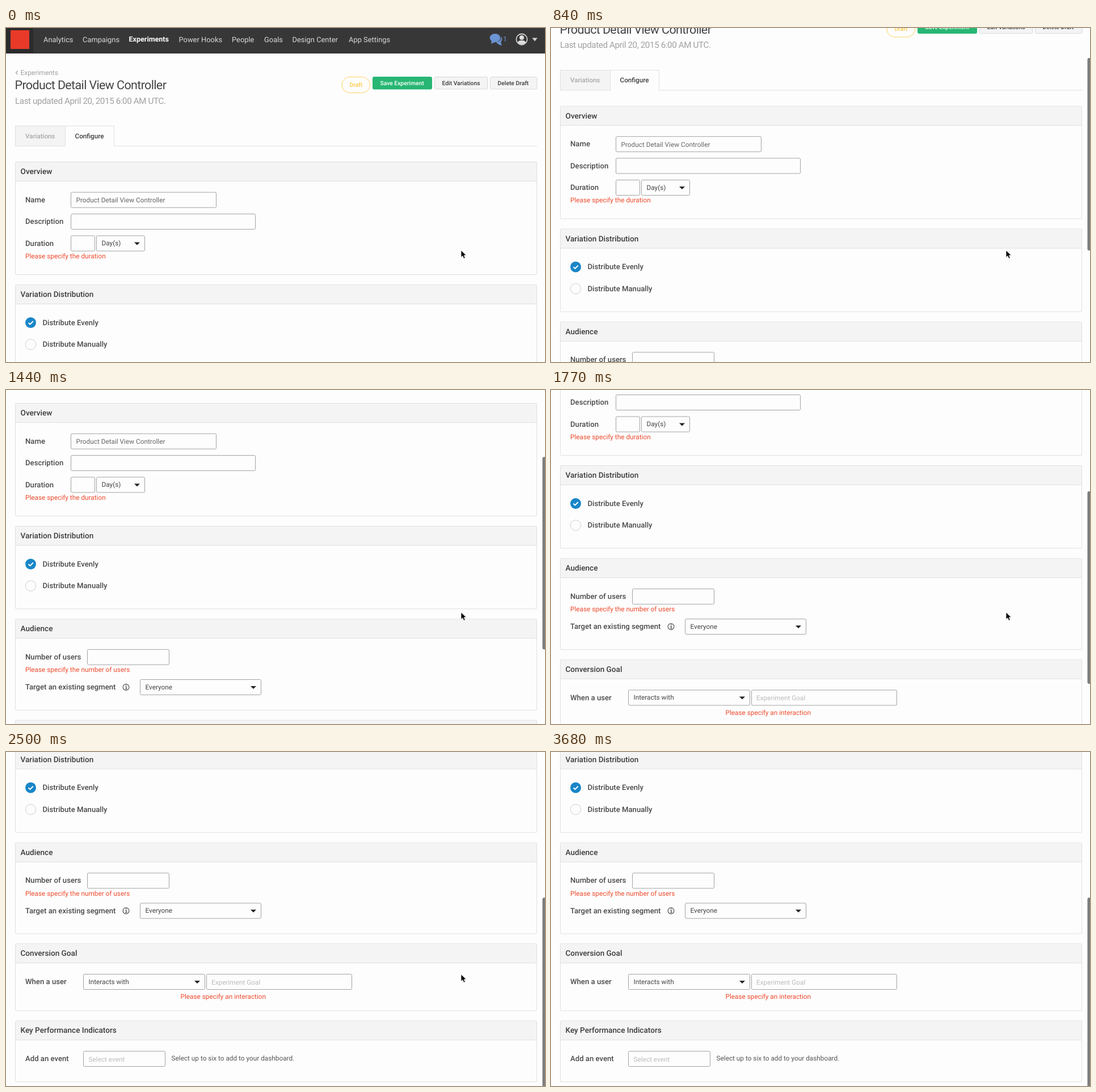
These frames come from a looping animation (950x590 px, 4480 ms). An HTML page:

```html
<!DOCTYPE html>
<html lang="en">
<head>
<meta charset="utf-8">
<title>Experiment settings</title>
<style>
  html, body { margin: 0; width: 100%; height: 100%; overflow: hidden; background: #fdfdfd; }
  svg { display: block; width: 950px; height: 590px; }
  text { font-family: Roboto, Inter, sans-serif; white-space: pre; text-rendering: geometricPrecision; }
</style>
</head>
<body>
<svg id="stage" viewBox="0 0 950 590">
  <g id="page"></g>
  <rect id="thumb" x="945.5" width="8" height="340" rx="3" fill="#7c7c7c"/>
  <path id="cursor" d="M0 0V12.6L2.9 9.9 5 14.5 7.3 13.5 5.3 9H9.3Z" fill="#000" stroke="#fff" stroke-width=".8"/>
</svg>
<script>
const LOOP = 4480;
// [start time, scroll offset]
const SCROLL = [
  [0, 0], [450, 14], [690, 58], [840, 98.5], [990, 134], [1140, 168.5],
  [1290, 195], [1440, 213], [1620, 237], [1770, 320], [1910, 390],
  [2060, 431.5], [2210, 445], [2350, 453], [2500, 457.5], [2650, 459],
  [2800, 460], [2940, 458.5], [3090, 457.5]
];
// [start time, tip x, tip y]
const POINTER = [
  [0, 802, 392.7], [3090, 868.7, 473.5], [3240, 920.7, 537.5],
  [3390, 931.7, 561.5], [3530, 933.7, 575.5], [3680, 960, 600]
];
const INK = '#4a4a4a', DARK = '#3b3b3b', GREY = '#a0a0a0', RED = '#ee4a2d';
const FIELD = '#a3a3a3', EDGE = '#e0e0e0', SHADE = '#f4f4f4', PAPER = '#fdfdfd';

const $ = id => document.getElementById(id);
const page = $('page');

function add(tag, attrs, content) {
  const node = document.createElementNS('http://www.w3.org/2000/svg', tag);
  for (const key in attrs) node.setAttribute(key, attrs[key]);
  if (content) node.textContent = content;
  page.append(node);
  return node;
}
const box = (x, y, right, bottom, fill, stroke = 'none', rx = 0) =>
  add('rect', { x, y, width: right - x, height: bottom - y, fill, stroke, rx });
const path = (d, fill, stroke = 'none', width = 1) =>
  add('path', { d, fill, stroke, 'stroke-width': width });
const circle = (cx, cy, r, fill, stroke = 'none', width = 1) =>
  add('circle', { cx, cy, r, fill, stroke, 'stroke-width': width });

// Text is placed by its left edge and the middle of its capitals.
const write = (content, x, middle, size, fill = INK, weight = 400, spacing = 0) =>
  add('text', {
    x, y: middle + size * 0.355, fill,
    'font-size': size, 'font-weight': weight, 'letter-spacing': spacing
  }, content);
const label = (content, x, middle) => write(content, x, middle, 13.15, INK, 500);
const small = (content, x, middle, fill) => write(content, x, middle, 11.8, fill);

const field = (x, y, right) => box(x, y, right, y + 27, PAPER, FIELD, 2);
const caret = (x, y, fill, w = 5, h = 5) =>
  path(`M${x - w} ${y - h / 2}h${2 * w}l${-w} ${h}z`, fill);

function select(content, x, y, right) {
  field(x, y, right);
  small(content, x + 9, y + 13.2, '#444');
  caret(right - 13.5, y + 14, '#222');
}
function panel(title, top, bottom) {
  box(16.5, top, 935.5, bottom, PAPER, EDGE, 1.5);
  box(17, top + 0.5, 935, top + 34, SHADE);
  box(17, top + 33.5, 935, top + 34.5, EDGE);
  write(title, 25.5, top + 16.7, 13.6, DARK, 500);
}
function button(content, x, right, textX, fill, stroke, ink) {
  box(x, 86.5, right, 108, fill, stroke, 2);
  write(content, textX, 97.2, 10.3, ink, 500);
}

function drawTopBar() {
  box(0, 0, 950, 45, '#383738');
  box(0, 0, 48, 45, '#2c2b2c');
  box(0, 44, 950, 45, '#2b2a2b');
  box(8, 4, 41, 37, '#e93a29');
  [['Analytics', 66], ['Campaigns', 135], ['Power Hooks', 304.5], ['People', 398],
   ['Goals', 455], ['Design Center', 504.5], ['App Settings', 604]]
    .forEach(([name, x]) => write(name, x, 20, 12.9, '#dadada'));
  write('Experiments', 216.5, 20, 12.55, '#fff', 700);

  const blue = '#6b94d3';
  path('M864 25Q873 24 873 15Q876 20 872 25L874 30.5Q869 30 867 28Q865 27 864 25Z', blue);
  add('ellipse', { cx: 862, cy: 17.5, rx: 9.3, ry: 7.5, fill: blue });
  path('M856 22L855 27.5Q860 27 863 24Z', blue);
  write('1', 876, 20, 12.5, blue);

  circle(909, 20, 9.6, '#383738', '#dedede', 1.6);
  circle(909, 17, 4, '#dedede');
  path('M902 26Q903 22 907 22H911Q915 22 916 26Q909 32 902 26Z', '#dedede');
  caret(932, 20.5, '#d0d0d0', 4.7, 6);
}

function drawHeading() {
  path('M20.5 75.5L17.5 78.7L20.5 82', 'none', GREY, 1.2);
  write('Experiments', 25.5, 79, 12, GREY);
  write('Product Detail View Controller', 15.5, 100.7, 21.5, '#444', 400, -0.64);
  write('Last updated April 20, 2015 6:00 AM UTC.', 16, 128.4, 15.2, GREY, 400, -0.39);

  box(592, 86.5, 641.5, 114.5, PAPER, '#fbd25f', 14);
  write('Draft', 605.5, 100.3, 10.3, '#fbc93f', 500);
  button('Save Experiment', 646.5, 750.5, 659.5, '#27b673', '#27b673', '#fff');
  button('Edit Variations', 755.5, 848.5, 768.5, SHADE, '#d9d9d9', DARK);
  button('Delete Draft', 853.5, 936, 866.5, SHADE, '#d9d9d9', DARK);

  box(16.5, 173, 104.5, 208.5, SHADE, EDGE);
  path('M104.5 208.5V173H190.5V208.5H936', 'none', EDGE);
  write('Variations', 34, 190.5, 11.5, '#a8a8a8', 500);
  write('Configure', 121.5, 190.5, 11.7, DARK, 500);
}

function drawForm() {
  panel('Overview', 236.5, 435.5);
  label('Name', 34, 303);
  field(114.5, 290.2, 370.5);
  small('Product Detail View Controller', 123.5, 304, '#666');
  label('Description', 34, 341.5);
  field(114.5, 328.5, 439.5);
  label('Duration', 34, 380);
  field(114.5, 367, 156.5);
  select('Day(s)', 159.5, 367, 244.5);
  small('Please specify the duration', 34, 402.5, RED);

  panel('Variation Distribution', 453.5, 599.7);
  circle(43.5, 520.5, 9.5, '#1986c8');
  path('M39.5 520.7L42.5 523.5L47.8 518', 'none', '#fff', 1.9);
  label('Distribute Evenly', 64.5, 520);
  circle(43.5, 559, 9.2, PAPER, '#cecece');
  label('Distribute Manually', 64.5, 558.5);

  panel('Audience', 617.7, 778.5);
  label('Number of users', 34, 684);
  field(143.5, 671.3, 287.5);
  small('Please specify the number of users', 34, 707, RED);
  label('Target an existing segment', 34, 737.5);
  circle(211.5, 738, 5.4, 'none', '#444', 1.1);
  path('M210.3 737H212V741M210 741H213.5M211 734.7H212.5', 'none', '#444', 1.2);
  select('Everyone', 236.5, 724.5, 449.5);

  panel('Conversion Goal', 796.3, 914.5);
  label('When a user', 34, 863);
  select('Interacts with', 136.5, 850, 350.5);
  field(353.5, 850, 609.5);
  small('Experiment Goal', 362, 864, '#bcbcbc');
  small('Please specify an interaction', 307.5, 889.7, RED);

  panel('Key Performance Indicators', 932.3, 1040);
  label('Add an event', 34, 998.5);
  field(136.5, 986, 280.5);
  small('Select event', 145.5, 1000, '#bcbcbc');
  small('Select up to six to add to your dashboard.', 291.5, 998.2, '#555');
}

const stepAt = (steps, t) => steps.findLast(([start]) => start <= t);

function render(now) {
  const t = now % LOOP;
  const scroll = stepAt(SCROLL, t)[1];
  const [, x, y] = stepAt(POINTER, t);
  page.setAttribute('transform', `translate(0 ${-scroll})`);
  $('thumb').setAttribute('y', 53 + (scroll - 98.5) * 0.569);
  $('thumb').style.visibility = scroll ? 'visible' : 'hidden';
  $('cursor').setAttribute('transform', `translate(${x} ${y})`);
}

drawTopBar();
drawHeading();
drawForm();

const begin = performance.now();
function tick() {
  render(performance.now() - begin);
  requestAnimationFrame(tick);
}
tick();
</script>
</body>
</html>
```
